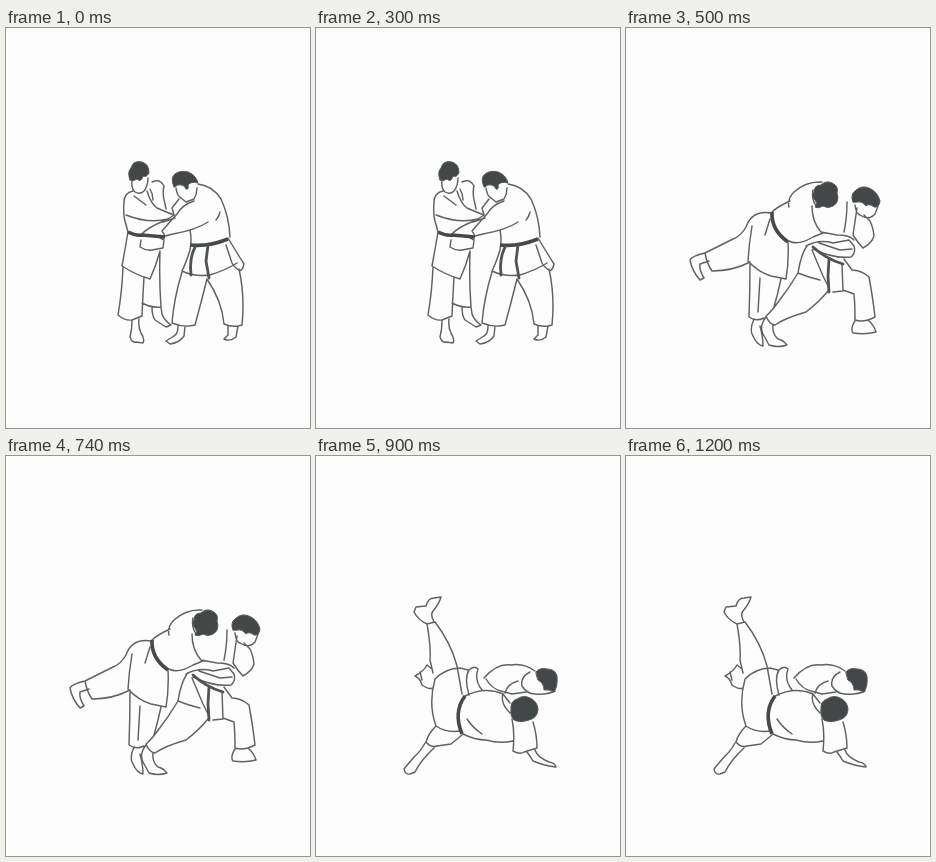
Recreate the animation shown at these times as an HTML page. Size 304 px wide and 400 px high, loop 1400 ms.

```html
<!DOCTYPE html>
<html lang="en">
<head>
<meta charset="utf-8">
<title>Judo throw</title>
<style>
  html, body { margin: 0; width: 100%; height: 100%; overflow: hidden; background: #fcfdfc; }
  svg { display: block; width: 100%; height: 100%; }
  g { filter: blur(.55px); }
  path { fill: none; stroke-linecap: round; stroke-linejoin: round; }
  .line { stroke: #606262; stroke-width: 1.45; }
  .belt { stroke: #464949; stroke-width: 3.6; stroke-linecap: butt; }
  .tail { stroke: #505353; stroke-width: 2.8; }
  .hair { fill: #434747; stroke: #555959; stroke-width: 1; }
</style>
</head>
<body>
<svg id="stage" viewBox="0 0 304 400"></svg>
<script>
const poses = [
  { // grip
    hold: 500,
    line: `
      M126 153Q125 160 129 164Q134 167 138 163Q142 158 142 150
      M127 163Q118 165 118 174Q117 187 119 193L122 204Q119 222 116 238Q130 247 144 251Q150 238 154 223
      M141 163Q145 176 151 180Q160 184 168 187L162 191Q143 196 120 187M128 168L140 177
      M146 154Q154 150 158 158Q156 166 159 176L160 181M144 161Q147 166 147 172
      M135 207Q142 199 158 193M135 212L134 219Q140 223 146 222L157 220L158 212L151 208
      M117 239Q116 264 112 287Q119 293 126 292L136 288Q137 266 138 249
      M154 224Q153 252 155 279Q145 280 136 275
      M126 293Q126 302 124 309Q126 315 130 314L137 315Q139 311 135 305Q132 299 133 291
      M146 279Q146 288 149 292L160 299L165 297Q158 292 156 286L155 279
      M170 160Q171 168 175 170L180 174L188 171Q191 166 191 160
      M192 156Q207 158 215 171Q223 188 224 209
      M188 173Q176 177 171 186Q162 196 156 203L159 208L167 206Q190 202 202 194
      M173 171L166 180L168 187M157 194L169 190M214 184Q213 189 210 192
      M184 202Q186 212 184 222Q180 235 176 243Q188 249 204 247Q220 242 231 235
      M222 210Q231 225 238 236Q237 241 234 243Q228 239 226 235L220 217
      M176 244Q168 270 166 295Q178 300 189 297Q195 275 201 251Q216 273 218 296Q227 300 236 297Q239 268 233 241
      M172 298Q172 306 168 308L160 313L164 316Q173 315 178 308L179 298
      M222 298L222 307L218 311Q224 314 230 309L232 298`,
    belt: `M122 204Q130 208 136 207L159 209M184 217Q202 219 222 211`,
    tail: `M189 219Q183 231 185 247M202 217L200 233L203 250`,
    hair: `M124 152Q121 144 125 140Q127 132 136 134Q143 136 143 145Q140 150 137 148Q135 155 131 151Q127 154 124 152Z
      M168 159Q164 150 169 146Q174 142 182 144Q190 147 192 155Q185 153 182 157Q183 162 180 161Q178 156 172 157Z`
  },
  { // lift
    hold: 400,
    line: `
      M196 154Q180 153 168 164Q161 171 163 179M164 173Q151 179 146 184
      M145 185Q126 182 120 199Q115 208 107 211L79 225
      M187 162Q185 172 191 179M186 178Q186 194 195 204L211 207
      M163 213Q172 218 187 209L197 205
      M79 225Q66 228 64 232Q66 243 74 252L78 250Q73 242 74 236L83 233
      M79 225Q81 236 86 243Q107 243 124 234
      M126 198Q123 216 122 233Q132 244 145 248L160 251Q163 234 162 214M144 191L139 207
      M124 235Q124 262 123 289Q130 294 138 290M155 251Q152 265 148 279M134 250L132 284
      M128 291Q123 302 127 308Q131 317 137 318Q137 309 134 298
      M181 218Q175 226 172 245Q163 260 153 273Q145 284 140 288Q143 296 149 297Q159 290 180 284Q193 274 202 263
      M140 289Q133 298 137 306L143 317Q152 320 161 317Q157 312 152 311Q146 306 147 297
      M172 245Q185 250 194 252M180 218Q193 211 207 215L223 212L228 218Q230 225 225 229Q208 231 187 221
      M193 215L214 222L226 221M211 207Q224 207 228 212
      M221 174Q221 190 218 204M231 180L227 207Q232 215 237 220Q246 215 248 208Q247 199 244 193L238 187
      M229 177Q230 186 234 187Q243 193 249 186L252 178
      M218 231L226 242Q235 242 243 249Q247 271 249 289Q238 295 229 292Q229 277 228 266L217 262
      M229 293Q224 301 227 305Q239 307 250 304Q248 297 242 292
      M186 222L197 248L203 260M216 236L217 263L207 264`,
    belt: `M146 184Q145 202 162 214`,
    tail: `M187 219Q200 231 217 236M203 231L202 248L203 264`,
    hair: `M188 164Q188 157 195 157Q200 152 206 155Q213 158 211 165Q214 174 207 178Q202 181 197 178Q192 181 189 179Q192 175 189 172Q185 168 188 164Z
      M227 174Q224 167 229 163Q236 156 245 161Q252 165 254 173Q253 180 248 179Q243 175 240 178Q236 173 232 174Z`
  },
  { // throw
    hold: 500,
    line: `
      M111 168Q102 164 98 156L100 151L110 150Q112 142 118 142L125 141Q123 148 117 155Q114 159 118 166
      M111 168L119 166Q135 187 141 210L146 238M111 168Q115 190 114 204L117 217
      M144 212Q130 212 119 223Q112 248 120 270Q130 277 145 275
      M99 220Q108 215 111 209L116 213M99 220Q104 222 106 229Q113 234 117 232M104 216L106 224
      M120 270Q112 278 110 286Q115 292 121 290L135 288L146 279
      M109 287Q104 296 99 300Q92 308 88 313Q89 319 94 318L99 316Q105 304 118 292
      M149 240Q169 230 187 238L194 247M147 278Q159 284 170 284Q184 288 197 285
      M153 239Q148 222 153 214Q158 209 162 213Q158 224 166 234M144 212L152 214
      M151 263Q157 272 166 278M187 238Q184 247 194 257
      M168 222Q181 207 195 209Q208 207 219 215M170 223Q176 233 185 235L196 238L210 236
      M214 216Q204 221 206 230Q211 238 219 238Q231 239 239 235M189 237Q191 228 202 225
      M196 263Q199 277 197 295Q204 299 208 296L221 292Q221 279 217 266
      M211 296Q214 300 217 305Q229 310 240 311Q239 307 233 306Q221 301 219 294`,
    belt: `M149 240Q137 256 146 278`,
    tail: ``,
    hair: `M220 216Q224 211 231 213Q239 213 241 220Q242 230 238 236Q233 233 228 234Q228 227 222 224Z
      M195 254Q194 245 201 243Q208 238 216 243Q222 247 222 254Q221 262 213 264Q204 267 198 264Q194 260 195 254Z`
  }
];

const loop = poses.reduce((sum, p) => sum + p.hold, 0);
const stage = document.getElementById("stage");

function add(parent, tag, attrs = {}) {
  const el = document.createElementNS("http://www.w3.org/2000/svg", tag);
  for (const key in attrs) el.setAttribute(key, attrs[key]);
  return parent.appendChild(el);
}

const groups = poses.map(pose => {
  const g = add(stage, "g");
  for (const kind of ["line", "belt", "tail", "hair"])
    add(g, "path", { class: kind, d: pose[kind] });
  return g;
});

function draw(ms) {
  let t = ms % loop, now = 0;
  while (t >= poses[now].hold) t -= poses[now++].hold;
  groups.forEach((g, i) => g.setAttribute("display", i === now ? "inline" : "none"));
}

const start = performance.now();
function tick() {
  draw(performance.now() - start);
  requestAnimationFrame(tick);
}
tick();
</script>
</body>
</html>
```
